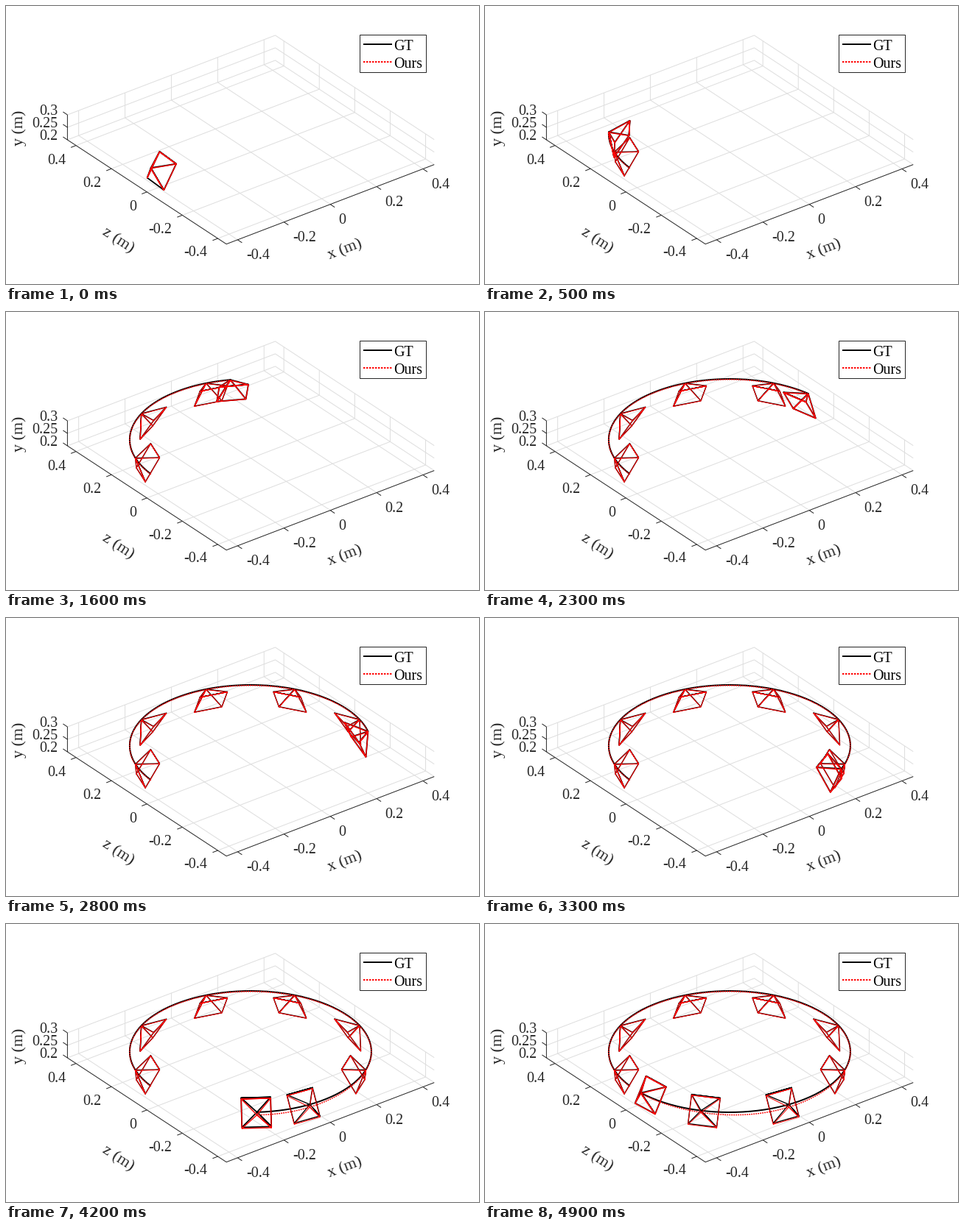
Recreate the animation shown at these times as a matplotlib script. Size 642x378 px, loop 5000 ms.

```python
import numpy as np
import matplotlib.pyplot as plt
from matplotlib.animation import FuncAnimation
from matplotlib.patches import Rectangle

W, H, DPI = 642, 378, 100
FRAMES, INTERVAL = 50, 100
PX = 72 / DPI
INK, GRID, RED = "#262626", "#dedede", "#ff0000"
LIMIT, FLOOR, TOP = 0.4485, 0.2, 0.3
TICKS = [-0.4, -0.2, 0, 0.2, 0.4]
HEIGHTS = [0.2, 0.25, 0.3]
DOTS = (0, (1.2, 0.8))

# Ring of camera positions, in pixels and degrees
CENTER = np.array([331.4, 173])
RADIUS, TILT, RISE = 164, 0.503, 0.864
START, STEP = 145.6, 7.175
FIRST_KEPT, KEPT_STEP = 162.3, 43.05

plt.rcParams["font.family"] = "Liberation Serif"
fig = plt.figure(figsize=(W / DPI, H / DPI), dpi=DPI, facecolor="white")
ax = fig.add_axes([0, 0, 1, 1])
ax.set_xlim(-0.5, W - 0.5)
ax.set_ylim(H - 0.5, -0.5)
ax.axis("off")


def world(x, y, z):
    """Project a point in metres to the stage."""
    return np.array([331.8 + 314.5 * x - 240.5 * z,
                     198.3 - 120.5 * x - 158 * z - 340 * (y - FLOOR)])


def line(points, color, width, **style):
    xs, ys = np.transpose(points)
    style.setdefault("solid_capstyle", "butt")
    return ax.plot(xs, ys, color=color, lw=width * PX, **style)[0]


def label(x, y, text, size=20, **style):
    ax.text(x, y, text, fontsize=size * PX, **{"color": INK, **style})


def draw_axes():
    for t in TICKS:
        line([world(t, FLOOR, -LIMIT), world(t, FLOOR, LIMIT),
              world(t, TOP, LIMIT)], GRID, 1)
        line([world(-LIMIT, FLOOR, t), world(LIMIT, FLOOR, t),
              world(LIMIT, TOP, t)], GRID, 1)
    for y in HEIGHTS:
        line([world(-LIMIT, y, LIMIT), world(LIMIT, y, LIMIT),
              world(LIMIT, y, -LIMIT)], GRID, 1)

    line([world(-LIMIT, TOP, LIMIT), world(-LIMIT, FLOOR, LIMIT),
          world(-LIMIT, FLOOR, -LIMIT), world(LIMIT, FLOOR, -LIMIT)], INK, 1)

    def tick(point, dx, dy):
        line([point, point + (dx, dy)], INK, 1)

    for i, t in enumerate(TICKS):
        tick(world(t, FLOOR, -LIMIT), 6, 4)
        tick(world(-LIMIT, FLOOR, t), -7, 2.7)
        label(326 + 62.6 * i, 343.7 - 24 * i, f"{t:g}")
        label(272.5 - 48 * i, 339.8 - 31.4 * i, f"{t:g}", ha="right")
    for i, y in enumerate(HEIGHTS):
        tick(world(-LIMIT, y, LIMIT), -6, -4)
        label(70, 181.8 - 17 * i, f"{y:g}", ha="right")

    for x, y, text, angle in [(460, 331.5, "x (m)", 21), (151, 318.5, "z (m)", -33),
                              (18, 165, "y (m)", 90)]:
        label(x, y, text, 22, rotation=angle, ha="center", va="center",
              rotation_mode="anchor")


def draw_legend():
    ax.add_patch(Rectangle((479, 38), 90, 51, fc="white", ec=INK, lw=PX, zorder=8))
    line([(484, 51.5), (523, 51.5)], "black", 2, zorder=9)
    line([(484, 75.5), (523, 75.5)], RED, 2, zorder=9, ls=DOTS)
    label(526, 59.3, "GT", color="black", zorder=9)
    label(526, 83.3, "Ours", color="black", zorder=9)


def ring(degrees):
    a = np.radians(degrees)
    return CENTER + RADIUS * np.stack([np.cos(a), TILT * np.sin(a)], axis=-1)


def drift(degrees):
    """Downward error of the estimate, largest on the near side."""
    return 0.7 + 3.4 * np.exp(-((degrees - 435) / 36) ** 2)


def frustum(degrees, error=0):
    """Edges of a camera pyramid looking inward and down."""
    c, s = np.cos(np.radians(degrees)), np.sin(np.radians(degrees))

    def flat(x, y, z):
        return np.array([x, TILT * y - RISE * z])

    apex = ring(degrees)
    base = apex + flat(-17.9 * c, -17.9 * s, -10.5) + (0, 0.4 * error)
    apex = apex + (0, error)
    side = 20 * flat(-s, c, 0)
    up = 20 * flat(-0.508 * c, -0.508 * s, 0.862)
    a, b, d, e = base + side + up, base - side + up, base - side - up, base + side - up
    return [apex, a, b, apex, d, b, a, e, apex, d, e]


class Camera:
    def __init__(self, truth_width, guess_width):
        self.truth = line([(0, 0)], "black", truth_width, zorder=3)
        self.guess = line([(0, 0)], RED, guess_width, zorder=5)

    def place(self, degrees, closed=True):
        edges = frustum(degrees, drift(degrees))
        self.truth.set_data(*np.transpose(frustum(degrees)))
        self.guess.set_data(*np.transpose(edges if closed else edges[:-1]))

    def show(self, visible):
        self.truth.set_visible(visible)
        self.guess.set_visible(visible)


draw_axes()
draw_legend()
truth_path = line([(0, 0)], "black", 2, zorder=4)
guess_path = line([(0, 0)], RED, 1.5, zorder=4.5, ls=DOTS)
kept_angles = FIRST_KEPT + KEPT_STEP * np.arange(8)
kept = [Camera(1.4, 1) for _ in kept_angles]
for camera, angle in zip(kept, kept_angles):
    camera.place(angle)
current = Camera(1.8, 1.4)


def update(frame):
    now = START + STEP * frame
    angles = np.linspace(START, now, 4 * frame + 2)
    points = ring(angles)
    truth_path.set_data(*points.T)
    guess_path.set_data(points[:, 0], points[:, 1] + drift(angles))
    for camera, angle in zip(kept, kept_angles):
        camera.show(angle <= now)
    current.place(now, closed=frame > 0)


animation = FuncAnimation(fig, update, frames=FRAMES, interval=INTERVAL,
                          init_func=lambda: update(0), repeat=True)
plt.show()
```
